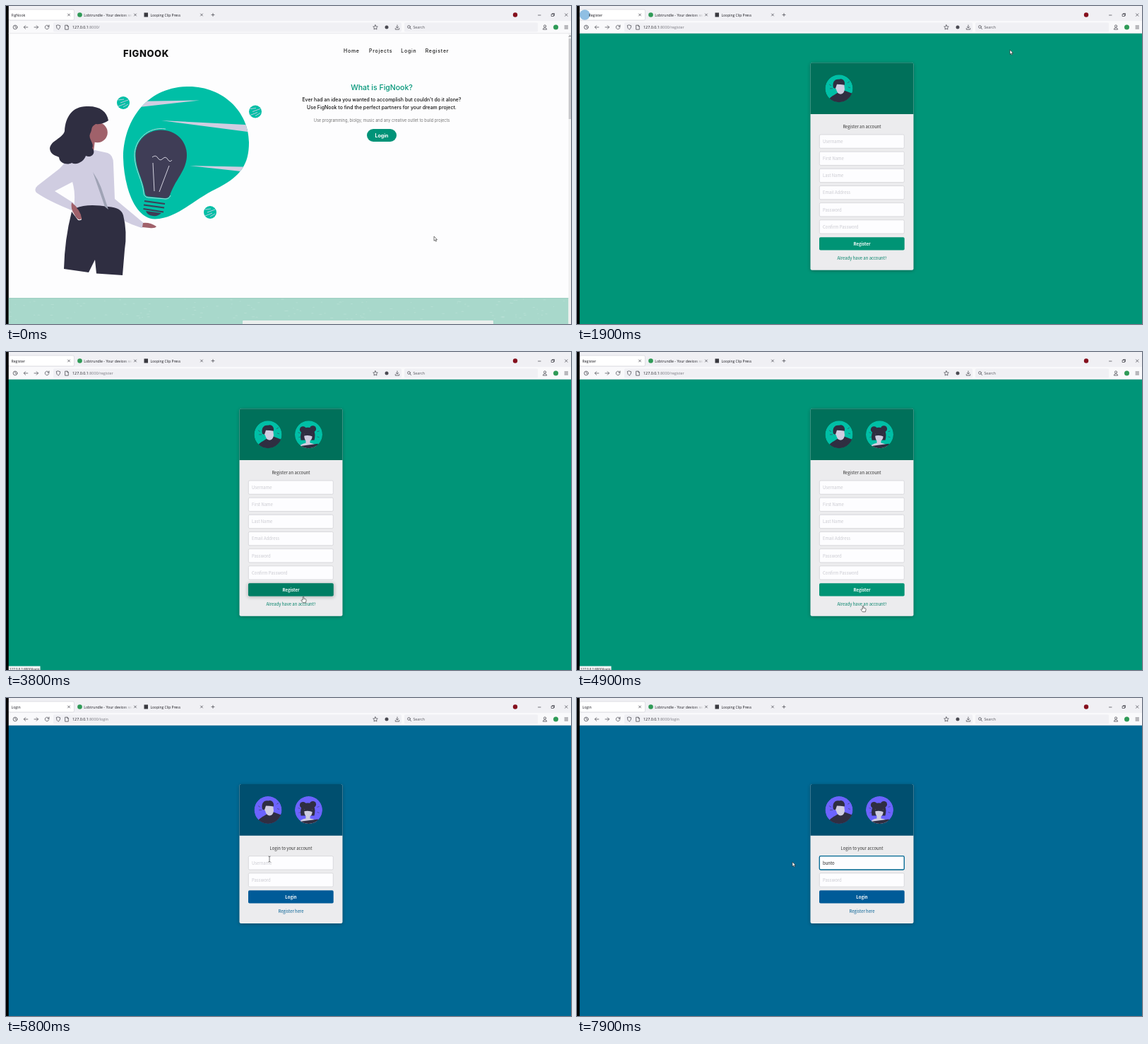
An HTML page that plays this animation: 800 px wide and 450 px high, repeating every 8000 ms.

```html
<!DOCTYPE html>
<html lang="en">
<head>
<meta charset="utf-8">
<title>FigNook walkthrough</title>
<style>
  html, body { margin: 0; width: 100%; height: 100%; overflow: hidden; background: #000; }
  svg { display: block; width: 800px; height: 450px; }
  text { white-space: pre; }
  .ui { font: 5.2px "Open Sans", sans-serif; fill: #1c1b22; }
  .home { font-family: Inter, sans-serif; font-weight: 500; }
  .form { font: 5.96px "Noto Sans CJK SC", "Noto Sans CJK JP", "Noto Sans CJK", sans-serif; }
  .mid { text-anchor: middle; }
  .icon { fill: none; stroke: #4a4a52; stroke-width: .75; stroke-linecap: round; stroke-linejoin: round; }
  .nav { font-size: 6.9px; letter-spacing: .8px; fill: #161616; }
</style>
</head>
<body>
<svg viewBox="0 0 800 450">
  <defs>
    <clipPath id="disc"><circle r="19.5"/></clipPath>
    <clipPath id="blobClip"><use href="#blob"/></clipPath>
    <filter id="soft" x="-20%" y="-20%" width="140%" height="140%"><feGaussianBlur stdDeviation="2.5"/></filter>
    <linearGradient id="fade"><stop offset="0" stop-color="#f0f0f4" stop-opacity="0"/><stop offset="1" stop-color="#f0f0f4"/></linearGradient>
    <g id="ball">
      <circle r="9" fill="#00bfa6"/>
      <path d="M-7-4 1-5M-4 0 7-4M-7 5 3 1M0 6 7 2" stroke="#d0cde1" stroke-width=".9"/>
    </g>
    <g id="man" clip-path="url(#disc)">
      <circle r="19.5" fill="currentColor"/>
      <path d="M-14-6l3 2M-13 0h4M12-8l3-2M13-2l3 1" stroke="#3f3d56" stroke-width=".6"/>
      <path d="M-18 20C-13 11-6 9-2 6L8 3 24 9V22H-18Z" fill="#2f2e41"/>
      <path d="M-5-9Q2-13 7-8L8 1Q7 8 2 8Q-3 7-4 1Q-7-1-5-4Z" fill="#d0cde1"/>
      <path d="M-8-1C-10-9-6-14 0-13C5-15 9-11 8-5Q2-6-3-6Q-4-3-5 0Z" fill="#2f2e41"/>
    </g>
    <g id="woman" clip-path="url(#disc)">
      <circle r="19.5" fill="currentColor"/>
      <path d="M-15-3l3 1M-14 4l3-1M12-4l3-1M12 3l3 1" stroke="#3f3d56" stroke-width=".6"/>
      <g fill="#2f2e41"><circle cx="-8" cy="-7" r="4.6"/><circle cx="6" cy="-8" r="4.6"/><path d="M-11 8C-13-3-8-10-1-10C7-10 11-3 8 8Z"/></g>
      <path d="M-6-1H5Q6 6 2 9V12Q11 13 14 20H-15Q-12 13-4 12V9Q-7 5-6-1Z" fill="#d0cde1"/>
      <path d="M-7 2Q-6-4-1-4Q6-4 6 3Q0 0-7 2Z" fill="#2f2e41"/>
      <path d="M-13 16.5 13 13 16 22H-14Z" fill="#2f2e41"/>
    </g>
  </defs>

  <g id="homePage" class="home">
    <rect x="3.5" y="38" width="797" height="412" fill="#fdfdfe"/>
    <text x="166" y="71.8" font-size="13" font-weight="800" letter-spacing=".6" fill="#111">FIGNOOK</text>
    <g class="nav">
      <text x="478" y="66">Home</text><text x="514" y="66">Projects</text><text x="559.3" y="66">Login</text>
      <text x="593.7" y="66" id="navLink">Register</text>
      <path id="navLine" d="M594 67.8h33.5" stroke="#1273b5" stroke-width=".6"/>
    </g>
    <g class="mid">
      <text x="532" y="119.3" font-size="10.5" fill="#009578">What is FigNook?</text>
      <g font-size="6.95" fill="#111">
        <text x="532" y="134.6">Ever had an idea you wanted to accomplish but couldn't do it alone?</text>
        <text x="532" y="145.9">Use FigNook to find the perfect partners for your dream project.</text>
      </g>
      <text x="532" y="164" font-size="5.65" font-weight="400" fill="#777">Use programming, biolgy, music and any creative outlet to build projects</text>
      <rect x="511" y="174" width="42" height="18" rx="9" fill="#009378"/>
      <text x="532" y="185.6" font-size="7" font-weight="700" fill="#fff">Login</text>
    </g>

    <path id="blob" fill="#00bfa6" d="M257 114C307 113 344 150 344 193C344 226 331 242 297 259C264 275 243 300 211 301.500C181 301 167 253 166 215C166 166 196 115 257 114Z"/>
    <path clip-path="url(#blobClip)" fill="#d0cde1" d="M180 135 274 133.500 180 144ZM220 162 350 168.500V179ZM260 226 350 228V236Z"/>
    <use href="#ball" x="166" y="137"/><use href="#ball" x="353" y="149.500"/><use href="#ball" x="289" y="292"/>
    <path fill="#3f3d56" d="M183.500 212C183 191 200 175.500 219 175.500C241 175.500 256 191 256 211C256 233 239 246 232 268Q230 272 225 272L201 269.500Q197 269 196.500 264C194 245 184 232 183.500 212Z"/>
    <path fill="none" stroke="#a9d9d8" stroke-width="1" d="M226 174C201 170 181 190 182 213C183 233 193 246 195 264Q195 270 201 271L226 273Q231 273 233 268"/>
    <g fill="none" stroke="#3f3d56" stroke-width="2"><path d="M196 276 225 280M195 281.500 224 285.500M194.500 287 223 291.500"/></g>
    <path fill="#3f3d56" d="M198 290 220 293Q215 298 208 297Q200 296 198 290Z"/>
    <path fill="none" stroke="#e4e2ee" stroke-width=".9" d="M208 222 210 262M231 226 217 263M207 214Q212 210 215 215T222 216T229 217T235 218"/>

    <path fill="#a0616a" d="M117 185 126 190 124 206 146 210 110 212Z"/>
    <circle cx="129.500" cy="179" r="14.300" fill="#a0616a"/>
    <path fill="#d0cde1" d="M101 212Q110 204 126 204L144 208Q152 211 152 223L154 273L196 308Q196 313 192 314Q165 306 143 288L96 285Q99 265 94 249L69 262L96 279L93 289Q60 276 43 264Q39 259 45 254L76 230Q88 215 101 212Z"/>
    <path fill="#a0616a" d="M93 278Q106 288 107 301Q102 305 97 295Q91 287 93 278ZM194 307Q204 306 213 312Q211 315 203 314L193 313Z"/>
    <path fill="#2f2e41" d="M99 286Q115 279 145 284Q163 285 166 296Q172 320 168 345L165 381L128 378.500L126 359L117 377L82 372Q83 330 93 291L102 303Q108 304 107 300Z"/>
    <path fill="#a0616a" d="M93 280Q106 288 107 301Q102 304 97 295Z"/>
    <path fill="#9fa3b5" d="M123 235Q132 248 136 261L145 288L140 284Z"/>
    <path fill="#2f2e41" d="M145 162C143 149 132 141 114 142C94 142 84 157 83 177C80 188 63 190 62 202C63 211 72 212 75 214C76 224 88 225 93 222C101 226 111 219 113 212C122 216 128 207 122 201C126 195 116 188 119 181C123 174 119 172 127 167Q137 168 145 162Z"/>

    <rect x="3.500" y="413" width="793" height="37" fill="#a8d8cb"/>
    <g id="specks" fill="#c2e5dc" opacity=".55"></g>
    <path d="M3.500 413.500h793" stroke="#98cbbd" stroke-width=".7"/>
    <rect x="335" y="445" width="355" height="8" rx="1" fill="#eaeeed"/>
    <rect x="796.500" y="39" width="3.500" height="411" fill="#f0f0f0"/>
    <rect x="796.700" y="46" width="3.300" height="114" fill="#c9c9cc"/>
    <path d="M797.300 43.500l1.300-1.800 1.300 1.800" class="icon"/>
  </g>

  <g id="registerPage" class="form"></g>
  <g id="loginPage" class="form"></g>

  <g class="ui">
    <rect x="3.500" width="797" height="21" fill="#f0f0f4"/>
    <rect x="3.500" y="21" width="797" height="17.700" fill="#f9f9fb"/>
    <path d="M3.500 38.700h797" stroke="#d4d4da" stroke-width=".5"/>
    <rect x="4" y="5" width="92.500" height="15" rx="1.700" fill="#fff" stroke="#cfcfd6" stroke-width=".6"/>
    <circle id="burst" cx="11" cy="12.500" fill="#4a97d2"/>
    <text id="tabTitle" y="14.800"></text>
    <circle id="spinner" cy="13" r=".9"/>
    <circle cx="104.500" cy="12.500" r="3.300" fill="#2f9a57"/>
    <text x="110.300" y="14.800">Lobtrundle - Your devices work</text>
    <rect x="165" y="7" width="14" height="11" fill="url(#fade)"/><rect x="179" y="7" width="12" height="11" fill="#f0f0f4"/>
    <rect x="195.500" y="9.500" width="5.500" height="6" fill="#3a3a40"/>
    <text x="204.500" y="14.800" font-size="5">Looping Clip Press</text>
    <g class="icon">
      <path id="closers"/>
      <path d="M291 12.500h4M293 10.500v4M753.500 13h3.500M772.500 11.500h3v3h-3zM773.500 11.500v-1h3v3h-1M791.500 10.800l3.500 3.500m0-3.500l-3.500 3.500"/>
      <circle cx="13" cy="30" r="2.900"/><path d="M13 28.300V30l1.200.8"/>
      <path d="M30.800 30h-5.500l2.300-2.300M25.300 30l2.300 2.300"/>
      <path d="M40 30h5.500l-2.300-2.300M45.500 30l-2.300 2.300"/>
      <path d="M60.700 29a2.800 2.800 0 1 0 .1 1.700M61 27v2.200h-2.200"/>
    </g>
    <rect x="67" y="23.500" width="493" height="13" rx="1.500" fill="#f0f0f4"/>
    <rect x="564" y="23.500" width="189" height="13" rx="1.500" fill="#f0f0f4"/>
    <g class="icon">
      <path d="M74 27l2.700.9q0 4.200-2.700 5.400q-2.700-1.200-2.700-5.400z"/>
      <path d="M84 27.200h2.800l1.500 1.500v4.500H84zM86.800 27.200v1.600h1.500"/>
      <path d="M523 26.800l1 2.100 2.300.3-1.700 1.600.4 2.300-2-1.100-2 1.100.4-2.300-1.700-1.600 2.300-.3z"/>
      <path d="M554 27v4m-1.700-1.500L554 31.200l1.700-1.700M551.300 31.500v1.700h5.400v-1.700"/>
      <circle cx="570.500" cy="29.500" r="1.900"/><path d="M572 31l1.600 1.700"/>
      <circle cx="763" cy="28.500" r="1.600"/><path d="M760.300 32.800q0-2 2.700-2t2.700 2z"/>
      <path d="M791 28h4.500M791 30h4.500M791 32h4.500"/>
    </g>
    <circle cx="539" cy="30" r="2.500" fill="#4a4a52"/>
    <circle cx="778.500" cy="30" r="3.500" fill="#2f9a57"/>
    <circle cx="721" cy="12.500" r="3.200" fill="#850f1d"/>
    <text x="94" y="32.300" font-size="5.400">127.0.0.1<tspan id="path" fill="#7a7a82"></tspan></text>
    <text x="576.500" y="32.100" fill="#55555c">Search</text>
    <g id="status">
      <rect id="statusBox" x="3.500" y="444.500" height="6" fill="#f5f5f7"/>
      <text id="statusText" x="5" y="450.500" font-size="4.500"></text>
    </g>
  </g>

  <rect width="3.500" height="450" fill="#000"/>
  <g id="pointer" stroke="#222" stroke-width=".6" stroke-linejoin="round" fill="#fff">
    <path id="arrow" d="M0 0V6.300L1.500 5 2.500 7.200 3.500 6.700 2.600 4.600H4.500Z"/>
    <path id="hand" d="M-.7 5V.6Q0-.4.8.6V3.200L3.400 3.800Q4.300 4.100 4.100 5.300L3.400 8.700H-.6L-3 5.600Q-2.700 4.300-1.700 5Z"/>
    <path id="beam" fill="none" d="M-1.500-4Q0-4 0-3Q0-4 1.500-4M0-3V3M-1.500 4Q0 4 0 3Q0 4 1.500 4"/>
  </g>
</svg>
<script>
const $ = id => document.getElementById(id);
const show = (id, on) => $(id).style.display = on ? '' : 'none';
const clamp = v => Math.max(0, Math.min(1, v));

// A sign-up or sign-in card; everything below the header hangs off its top edge.
function card(o) {
  const { id, top, height, fields } = o;
  const fieldY = i => top + 101.7 + i * 24.15;
  const buttonY = fieldY(fields.length) + .3;
  $(id + 'Page').innerHTML = `
    <rect x="3.5" y="38" width="797" height="412" fill="${o.bg}"/>
    <rect x="330.500" y="${top + 1}" width="146" height="${height}" rx="3" opacity=".3" filter="url(#soft)"/>
    <rect x="330.500" y="${top}" width="146" height="${height}" rx="2.500" fill="#ececee"/>
    <path d="M330.500 ${top + 72.800}v-70.300q0-2.500 2.500-2.500h141q2.500 0 2.500 2.500v70.300z" fill="${o.head}"/>
    <g color="${o.disc}">
      <use href="#man" x="371" y="${top + 36.500}"/>
      <use href="#woman" id="${id}Woman" x="428.500" y="${top + 36.500}"/>
    </g>
    <text class="mid" x="403.500" y="${top + 92.700}" fill="#333">${o.label}</text>
    ${fields.map((name, i) => `
      <rect x="343.300" y="${fieldY(i)}" width="120" height="19.300" rx="1.700" fill="#fdfdff" stroke="#d2d2d6" stroke-width=".8"/>
      <text id="${id}Hint${i}" x="348" y="${fieldY(i) + 12}" fill="#c9c9cf">${name}</text>`).join('')}
    <rect id="${id}Glow" x="342" y="${buttonY}" width="123" height="20" rx="3" opacity="0" filter="url(#soft)"/>
    <rect x="343" y="${buttonY}" width="120.700" height="18.300" rx="1.800" fill="${o.button}"/>
    <rect id="${id}Hover" x="343" y="${buttonY}" width="120.700" height="18.300" rx="1.800" fill="#005c4b" opacity="0"/>
    <text class="mid" x="403.500" y="${buttonY + 11.500}" font-weight="700" fill="#fff">${o.action}</text>
    <text class="mid" x="403.500" y="${buttonY + 31.800}" fill="${o.link}">${o.other}</text>`;
}
card({ id: 'register', top: 80.3, height: 293.5, bg: '#009578', head: '#00705a', disc: '#00bfa6',
  label: 'Register an account', action: 'Register', other: 'Already have an account?',
  fields: ['Username', 'First Name', 'Last Name', 'Email Address', 'Password', 'Confirm Password'],
  button: '#009475', link: '#008068' });
card({ id: 'login', top: 122, height: 197, bg: '#006994', head: '#004f6f', disc: '#6c63ff',
  label: 'Login to your account', action: 'Login', other: 'Register here',
  fields: ['Username', 'Password'], button: '#005b98', link: '#005f94' });
$('loginPage').insertAdjacentHTML('beforeend', `
  <rect id="focus" x="343.300" y="223.700" width="120" height="19.300" rx="1.700" fill="none" stroke="#006994" stroke-width="1.300"/>
  <text id="typed" x="348" y="235.700" fill="#222"></text>
  <path id="caret" stroke="#222" stroke-width=".6"/>`);

$('closers').setAttribute('d', [89, 183, 277].map(x => `M${x - 1.5} 11l3 3m0-3l-3 3`).join(''));

let seed = 7;
const rand = () => (seed = seed * 16807 % 2147483647) / 2147483647;
$('specks').innerHTML = Array.from({ length: 150 }, () =>
  `<ellipse cx="${5 + rand() * 790}" cy="${415 + rand() * 29}" rx="${.5 + rand() * 2}" ry=".5"/>`).join('');

// Pointer stops: time, x, y
const stops = [[0, 606, 326], [100, 606, 326], [500, 613, 62], [2000, 613, 62], [2500, 588, 113],
  [2950, 320, 300], [3400, 420, 335], [3650, 421, 338], [3800, 421, 346], [4400, 405, 359],
  [5000, 405, 359], [5750, 373, 228], [7400, 373, 228], [7900, 305, 232], [8000, 305, 232]];
function pointerAt(t) {
  const i = stops.findIndex(s => s[0] > t), [a, ax, ay] = stops[i - 1], [b, bx, by] = stops[i];
  const k = (t - a) / (b - a), e = k * k * (3 - 2 * k);
  return [ax + (bx - ax) * e, ay + (by - ay) * e];
}

const LOADING = 800, REGISTER = 1900, LOGIN = 5000, FOCUS = 6200;
const keys = [6500, 6600, 6800, 7100, 7200], userName = 'bunto';

function draw(t) {
  const page = t < REGISTER ? 'home' : t < LOGIN ? 'register' : 'login';
  for (const p of ['home', 'register', 'login']) show(p + 'Page', p === page);

  const [x, y] = pointerAt(t);
  const overNav = page === 'home' && y < 70;
  const overForm = page === 'register' && x > 343 && x < 464 && y > 326 && y < 362;
  const overField = page === 'login' && x > 343 && x < 464 && y > 223 && y < 244;
  $('pointer').setAttribute('transform', `translate(${x} ${y})`);
  show('hand', overNav || overForm);
  show('beam', overField);
  show('arrow', !overNav && !overForm && !overField);

  // Browser frame
  const shifted = t >= LOADING && t < 2000;
  $('tabTitle').textContent = { home: 'FigNook', register: 'Register', login: 'Login' }[page];
  $('tabTitle').setAttribute('x', shifted ? 16.5 : 7.5);
  $('path').textContent = ':8000/' + (page === 'home' ? '' : page);
  show('spinner', t >= LOADING && t < REGISTER);
  $('spinner').setAttribute('cx', 11 - 2.2 * Math.cos((t - 1800) / 160));
  const age = page === 'login' ? t - LOGIN : t - REGISTER + 60;
  $('burst').setAttribute('r', page === 'home' ? 0 : 6 + Math.min(age, 400) / 45);
  $('burst').setAttribute('opacity', .75 * clamp(1 - age / 350));

  const onLink = overForm && y > 345;
  show('status', overNav || onLink);
  $('statusText').textContent = '127.0.0.1:8000/' + (overNav ? 'register' : 'login');
  $('statusBox').setAttribute('width', overNav ? 52 : 45);

  // Pages
  $('navLink').style.fill = overNav ? '#1273b5' : '';
  show('navLine', overNav);
  show('registerWoman', t >= 2000);
  const hover = clamp((t - 3250) / 250) * clamp((4050 - t) / 250);
  $('registerHover').setAttribute('opacity', hover * .4);
  $('registerGlow').setAttribute('opacity', hover * .22);

  const typed = keys.filter(k => k <= t);
  $('typed').textContent = userName.slice(0, typed.length);
  show('loginHint0', !typed.length);
  $('focus').setAttribute('opacity', clamp((t - FOCUS + 50) / 150));
  const last = typed.length ? typed[typed.length - 1] : FOCUS;
  show('caret', t >= FOCUS && Math.floor((t - last) / 500) % 2 === 0);
  const end = page === 'login' && typed.length ? $('typed').getComputedTextLength() : 0;
  $('caret').setAttribute('d', `M${348.4 + end} 229.700v7.500`);
}

function tick() {
  draw(Math.floor(performance.now() % 8000 / 100) * 100);
  requestAnimationFrame(tick);
}
tick();
</script>
</body>
</html>
```
